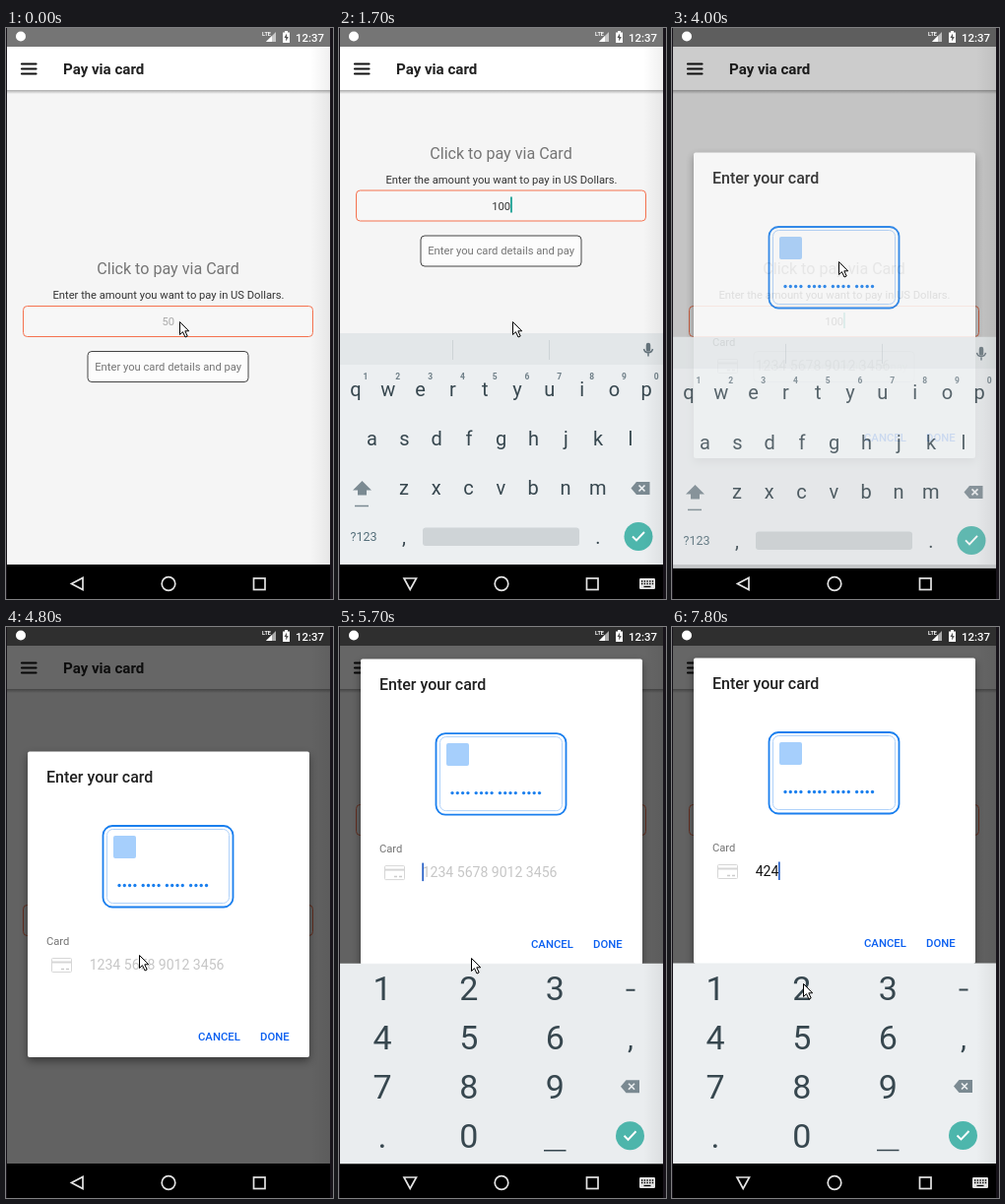
Animation of 332 by 580 pixels, one loop 8000 ms. Source, as an HTML page:

```html
<!DOCTYPE html>
<html lang="en">
<head>
<meta charset="utf-8">
<title>Card payment</title>
<style>
  html, body { margin: 0; width: 100%; height: 100%; overflow: hidden; background: #17131a; }
  svg { display: block; width: 332px; height: 580px; font-family: Roboto, sans-serif; }
  .mid { text-anchor: middle; }
  .line { fill: none; stroke: #e4e4e4; stroke-width: 1.7; }
  .small { font-size: 11.2px; }
  .letters { font-size: 20px; fill: #37474f; text-anchor: middle; }
  .hints { font-size: 8.5px; font-weight: 700; fill: #6f7f88; text-anchor: middle; }
  .digits { font-size: 34px; fill: #37474f; text-anchor: middle; }
  .action { font-size: 11.3px; font-weight: 500; fill: #0a5ff0; }
</style>
</head>
<body>
<svg viewBox="0 0 332 580">
  <defs>
    <linearGradient id="fall" x2="0" y2="1">
      <stop stop-color="#000" stop-opacity=".3"/><stop offset="1" stop-color="#000" stop-opacity="0"/>
    </linearGradient>
    <linearGradient id="edge">
      <stop stop-color="#000" stop-opacity="0"/><stop offset="1" stop-color="#000" stop-opacity=".06"/>
    </linearGradient>
    <filter id="soft" x="-10%" y="-10%" width="120%" height="120%"><feGaussianBlur stdDeviation="4"/></filter>
    <clipPath id="screen"><rect x="1" width="328" height="580"/></clipPath>
    <g id="erase">
      <path d="M-9.500 0 L-4 -6.500 H9.500 V6.500 H-4 Z" fill="#7b8a92"/>
      <path d="M-1.500 -3 L4.500 3 M4.500 -3 L-1.500 3" stroke="#eceff1" stroke-width="1.700"/>
    </g>
    <g id="confirm">
      <circle r="14.500" fill="#4db6ac"/>
      <path d="M-6 0 L-2 4 L6 -4.500" fill="none" stroke="#fff" stroke-width="1.900"/>
    </g>
  </defs>

  <g clip-path="url(#screen)">
    <rect width="332" height="545" fill="#f5f5f5"/>
    <g id="form">
      <text class="mid" x="164.500" y="250" font-size="16.100" fill="#757575">Click to pay via Card</text>
      <text class="mid small" x="165" y="275" fill="#333">Enter the amount you want to pay in US Dollars.</text>
      <rect x="17.500" y="282.500" width="294" height="31" rx="4" fill="#f7f7f7" stroke="#f5724f"/>
      <text id="amount" class="mid small" x="164.700" y="302"></text>
      <rect id="amountCaret" y="289" width="1.600" height="16" fill="#009688"/>
      <rect x="83" y="328.500" width="163" height="31" rx="4" fill="#fcfcfc" stroke="#444"/>
      <text class="mid small" x="164.700" y="347.500" fill="#757575">Enter you card details and pay</text>
    </g>
    <rect y="19" width="332" height="44" fill="#fff"/>
    <rect y="63" width="332" height="4" fill="url(#fall)"/>
    <path d="M16 36.500 H30.500 M16 41.500 H30.500 M16 46.500 H30.500" stroke="#111" stroke-width="2.200" stroke-linecap="round"/>
    <text x="58" y="47" font-size="15.100" font-weight="700" fill="#212121">Pay via card</text>
    <rect width="332" height="19" fill="#757575"/>
    <rect id="dim" width="332" height="545"/>

    <g id="status" fill="#fff">
      <circle cx="15" cy="8.500" r="5"/>
      <text x="260" y="7.500" font-size="5.500" font-weight="700">LTE</text>
      <path d="M274 4 V14 H264 Z" opacity=".6"/>
      <path d="M270 8 V14 H264 Z"/>
      <path d="M281 4.500 H283 V3 H286 V4.500 H288 V15 H281 Z"/>
      <path d="M285 5.500 L282.500 10 H284.200 V13.500 L286.800 9 H285 Z" fill="#555"/>
      <text x="294" y="13.500" font-size="11.400" font-weight="500">12:37</text>
    </g>

    <rect y="545" width="332" height="35"/>
    <g class="line">
      <path id="back"/>
      <circle cx="165" cy="564.500" r="6.800"/>
      <rect x="251.500" y="559" width="11.500" height="11.500"/>
    </g>
    <g id="switcher">
      <rect x="305" y="559" width="16" height="11" rx="1.200" fill="#e4e4e4"/>
      <path d="M307 562 H319.500 M307 564.500 H319.500" stroke="#000" stroke-width="1.300" stroke-dasharray="1.400 1.300"/>
      <path d="M309.500 567.500 H316.500" stroke="#000" stroke-width="1.300"/>
    </g>

    <g id="dialog">
      <rect x="22" y="130" width="286" height="311" opacity=".4" filter="url(#soft)"/>
      <rect x="22" y="126.500" width="286" height="310.500" rx="2" fill="#fff"/>
      <text x="41" y="158" font-size="16" font-weight="500" fill="#212121">Enter your card</text>
      <rect x="98.500" y="202" width="132" height="82.500" rx="9.500" fill="#fff" stroke="#1a7fee" stroke-width="1.800"/>
      <rect x="102.500" y="205.500" width="124" height="75" rx="6" fill="none" stroke="#b0d2fa"/>
      <rect x="109" y="212" width="23" height="23" rx="2" fill="#a6cffc"/>
      <g id="dots" fill="#1a7fee"></g>
      <text class="small" x="41" y="323" fill="#757575">Card</text>
      <rect x="46.500" y="336.500" width="20" height="14" rx="1" fill="none" stroke="#d6d6d6"/>
      <path d="M46 340.500 H67" stroke="#d6d6d6" stroke-width="2"/>
      <path d="M56 347.500 H59 M61 347.500 H64" stroke="#ccc" stroke-width="1.500"/>
      <text id="number" x="84.700" y="348" font-size="14.050"></text>
      <rect id="numberCaret" y="333.500" width="1.700" height="18.500" fill="#2962c8"/>
      <text class="action" x="195" y="419.500">CANCEL</text>
      <text class="action" x="258" y="419.500">DONE</text>
    </g>

    <g id="qwerty">
      <rect y="310" width="332" height="235" fill="#eceff1"/>
      <rect y="310" width="332" height="32" fill="#e3e7e9"/>
      <path d="M115.500 317 V337 M213.500 317 V337" stroke="#cdd3d6"/>
      <g fill="none" stroke="#66757d" stroke-width="1.500">
        <rect x="312.500" y="320.500" width="3" height="7.500" rx="1.500" fill="#66757d"/>
        <path d="M309.500 326 A4.600 4.600 0 0 0 318.500 326 M314 330.500 V333.500"/>
      </g>
      <g id="letterKeys" class="letters"></g>
      <g id="hintKeys" class="hints"></g>
      <path d="M23.500 460 L33 469.500 H28 V474.500 H19 V469.500 H14 Z" fill="#7b8a92"/>
      <path d="M16 485.500 H30" stroke="#7b8a92" stroke-width="1.500"/>
      <use href="#erase" x="306" y="467.500"/>
      <text class="mid" x="25" y="521" font-size="12.500" fill="#546e7a">?123</text>
      <rect x="85" y="507.500" width="159" height="18.500" rx="3" fill="#cfd4d7"/>
      <use href="#confirm" x="304" y="516.500"/>
    </g>

    <g id="numpad">
      <rect y="341.500" width="332" height="203.500" fill="#eceff1"/>
      <rect id="pressed" x="4" y="398" width="80" height="37" rx="2" fill="#cfd8dc"/>
      <g id="digitKeys" class="digits"></g>
      <path d="M208 531.500 H230.500" stroke="#37474f" stroke-width="1.500"/>
      <path d="M291.500 368.500 H300.500" stroke="#37474f" stroke-width="2"/>
      <text class="mid" x="296" y="428" font-size="30" fill="#37474f">,</text>
      <use href="#erase" x="295.500" y="466.500"/>
      <use href="#confirm" x="295.500" y="516.500"/>
    </g>
    <rect x="309" y="19" width="20" height="526" fill="url(#edge)"/>
  </g>
  <path id="pointer" d="M.5 .5 V13.500 L3.500 10.700 L6 16 L8.200 15 L5.800 9.800 H9.700 Z" fill="#fff" stroke="#000"/>
</svg>
<script>
const $ = id => document.getElementById(id);
const LOOP = 8000, STEP = 100;

// Static repeated parts
const row = (chars, x, y, pitch) => [...chars].map((c, i) => `<text x="${x + i * pitch}" y="${y}">${c}</text>`).join('');
const PITCH = 32.8;
$('letterKeys').innerHTML = row('qwertyuiop', 17, 373.5, PITCH) + row('asdfghjkl', 33.5, 424, PITCH)
  + row('zxcvbnm', 66, 474, PITCH) + row(',', 66, 524, 0) + row('.', 263, 524, 0);
$('hintKeys').innerHTML = row('1234567890', 27, 357, PITCH);
$('digitKeys').innerHTML = ['123', '456', '789', '.0'].map((keys, i) => row(keys, 44, 378.5 + i * 50.2, 87.7)).join('');
$('dots').innerHTML = Array.from({ length: 16 }, (_, i) =>
  `<circle cx="${115 + (i >> 2) * 24.2 + (i & 3) * 5.3}" cy="262.500" r="1.650"/>`).join('');

// Timing helpers
const progress = (t, a, b) => Math.min(1, Math.max(0, (t - a) / (b - a)));
const easeOut = (t, a, b) => 1 - (1 - progress(t, a, b)) ** 3;
const within = (t, a, b) => t >= a && t < b;
const latest = (t, steps) => steps.filter(s => s[0] <= t).pop()[1];

const pointerPath = [
  [0, 176, 298], [2300, 176, 298], [2900, 169, 237], [4400, 169, 237], [4800, 135, 333],
  [5000, 134, 336], [6800, 134, 336], [7300, 51, 415], [7600, 51, 415], [7800, 133, 362], [LOOP, 133, 362]
];
const amounts = [[0, ''], [1000, '1'], [1400, '10'], [1700, '100']];
const numbers = [[0, ''], [6100, '4'], [6400, '42'], [7600, '424']];

const show = (el, on) => el.setAttribute('visibility', on ? 'inherit' : 'hidden');
const move = (el, x, y) => el.setAttribute('transform', `translate(${x} ${y})`);

function place(el, shown, y) {
  el.setAttribute('opacity', shown);
  move(el, 0, y);
  show(el, shown > 0);
}

function field(el, value, hint, color, hintColor) {
  el.textContent = value || hint;
  el.setAttribute('fill', value ? color : hintColor);
}

function pointerAt(t) {
  const i = pointerPath.findIndex(p => p[0] > t);
  const [a, x0, y0] = pointerPath[i - 1], [b, x1, y1] = pointerPath[i];
  const p = progress(t, a, b), k = p * p * (3 - 2 * p);
  return [x0 + (x1 - x0) * k, y0 + (y1 - y0) * k];
}

function draw(t) {
  const typing = within(t, 100, 3900) || t >= 5400;
  $('back').setAttribute('d', typing ? 'M66 559 H78.500 L72.200 570.500 Z' : 'M78 558.500 V570.500 L66.500 564.500 Z');
  show($('switcher'), typing);

  move($('form'), 0, within(t, 300, 3900) ? -117.5 : t >= 5500 ? -102 : 0);
  const amount = latest(t, amounts);
  field($('amount'), amount, '50', '#333', '#aaa');
  $('amountCaret').setAttribute('x', amount ? 164.7 + amount.length * 3.15 : 158.2);
  show($('amountCaret'), within(t, 300, 2200) || within(t, 2700, 3100) || within(t, 3600, 4100));

  const enter = t < 300 ? 0 : easeOut(t, 260, 700);
  const leave = progress(t, 3860, 4200) ** 2;
  place($('qwerty'), enter * (1 - leave), 23 * (1 - enter + leave));

  const rise = t < 5400 ? 0 : easeOut(t, 5360, 5800);
  place($('numpad'), rise, 23 * (1 - rise));
  show($('pressed'), t === 7500);

  $('dim').setAttribute('opacity', 0.6 * progress(t, 3900, 4200));
  place($('dialog'), t < 3900 ? 0 : easeOut(t, 3860, 4160), -95 * rise);
  const number = latest(t, numbers);
  field($('number'), number, '1234 5678 9012 3456', '#111', '#c6c6c6');
  $('numberCaret').setAttribute('x', 84.3 + number.length * 7.9);
  show($('numberCaret'), within(t, 5200, 6900) || t >= 7300);

  move($('pointer'), ...pointerAt(t).map(Math.round));
}

function tick() {
  draw(Math.floor(performance.now() % LOOP / STEP) * STEP);
  requestAnimationFrame(tick);
}
tick();
</script>
</body>
</html>
```
